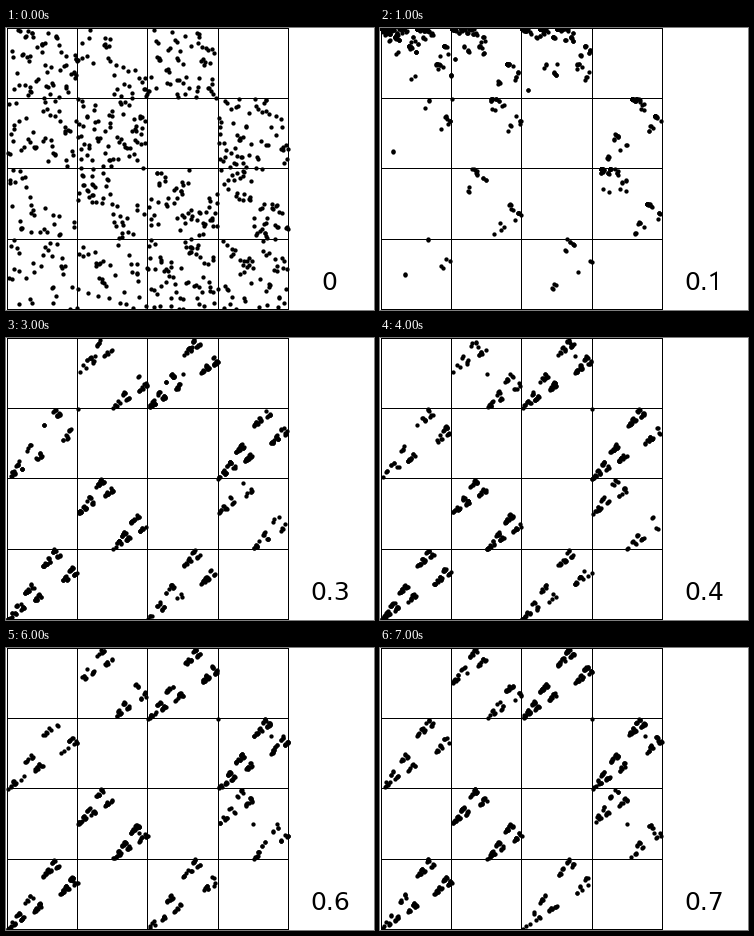
These frames come from a looping animation (368 px wide and 282 px high, 8 s). A matplotlib script:

```python
import matplotlib.pyplot as plt
from matplotlib.animation import FuncAnimation
from matplotlib.patches import Rectangle

W, H, DPI = 368, 282, 64
PT = 72 / DPI          # points per pixel
SIDE = 281             # width of the square in pixels
STEPS = 700
FRAMES = 8


def logistic(x):
    return 4 * x * (1 - x)


def driven_points(k):
    """Chaos game driven by the mean of two logistic maps, coupled by k / 10."""
    c = k / 10
    x, y = .517 + c / 2, .603 + c / 2
    px = py = .5
    xs, ys = [], []
    for _ in range(STEPS):
        quarter = min(int(2 * (x + y)), 3)
        px = (px + quarter % 2) / 2
        py = (py + quarter // 2) / 2
        xs.append(1.5 + SIDE * px)
        ys.append(.5 + SIDE * (1 - py))
        fx, fy = logistic(x), logistic(y)
        x, y = (1 - c) * fx + c * fy, (1 - c) * fy + c * fx
    return xs, ys


fig = plt.figure(figsize=(W / DPI, H / DPI), dpi=DPI, facecolor="white")
ax = fig.add_axes([0, 0, 1, 1])
ax.set_xlim(0, W)
ax.set_ylim(H, 0)
ax.axis("off")

for i in range(5):
    pos = round(SIDE * i / 4)
    ax.add_patch(Rectangle((1 + pos, 0), 1, SIDE + 1, color="black", lw=0))
    ax.add_patch(Rectangle((1, pos), SIDE + 1, 1, color="black", lw=0))

dots, = ax.plot([], [], "o", color="black", ms=4.3 * PT, mew=0,
                antialiased=False)
label = ax.text(0, 262, "", family="DejaVu Sans", size=25 * PT,
                color="black", ha="left", va="baseline")
# The digit one has no foot, so it is drawn as a stroke
one, = ax.plot([330.5, 336, 336], [248, 245, 262], color="black",
               lw=2 * PT, solid_capstyle="butt", solid_joinstyle="miter")

clouds = [driven_points(k) for k in range(FRAMES)]


def draw(k):
    dots.set_data(*clouds[k])
    label.set_x(304 if k else 315.5)
    label.set_text("0" if k == 0 else "0." if k == 1 else f"0.{k}")
    one.set_visible(k == 1)
    return dots, label, one


anim = FuncAnimation(fig, draw, frames=FRAMES, interval=1000,
                     repeat=True, repeat_delay=0)
plt.show()
```
